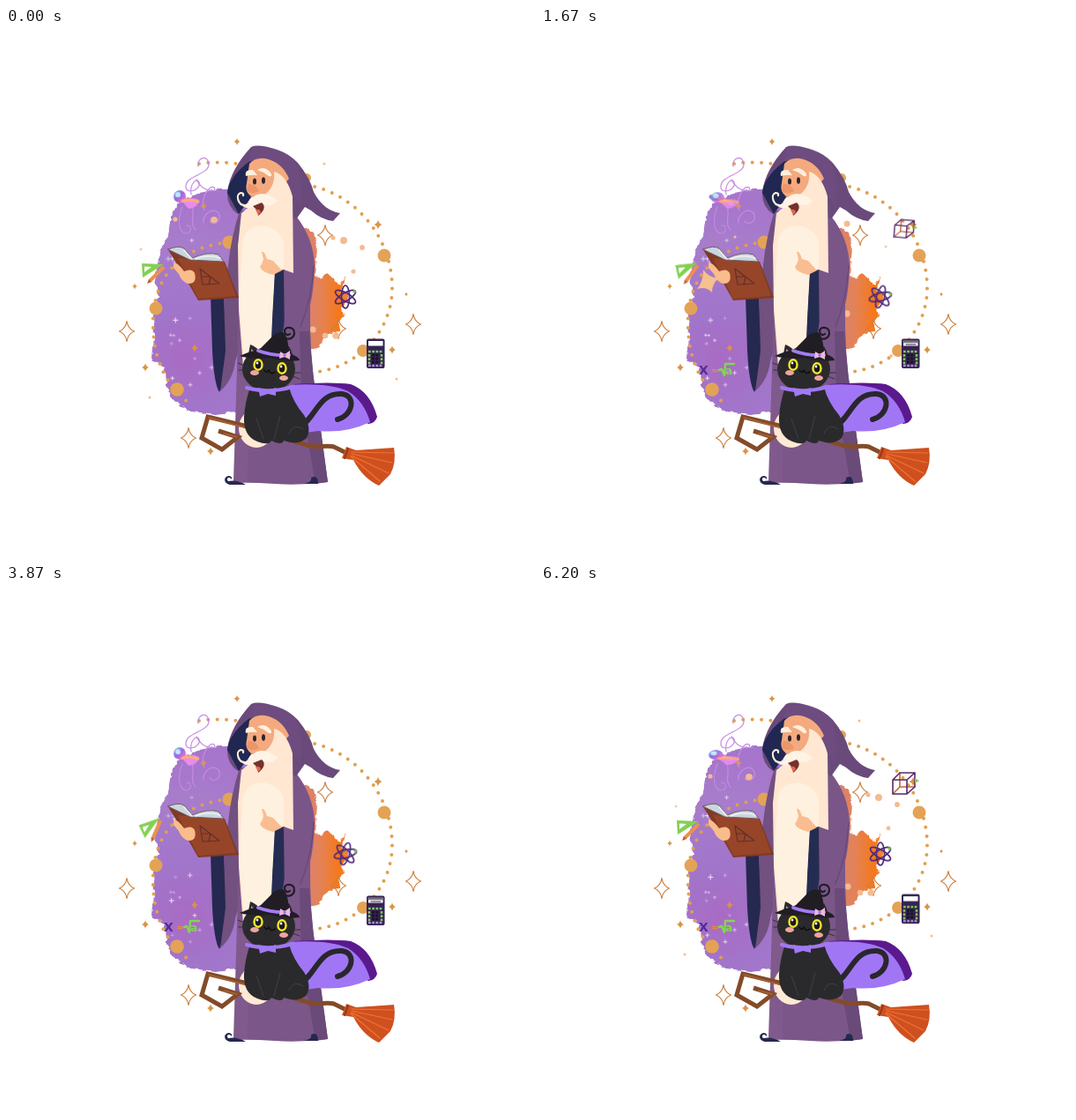
An HTML page that plays this animation: 600x600 px, repeating every 6230 ms.

```html
<!DOCTYPE html>
<html lang="en">
<head>
<meta charset="utf-8">
<title>Wizard and cat</title>
<style>
html, body { margin: 0; width: 100%; height: 100%; overflow: hidden; background: #fff; }
svg { display: block; width: 100%; height: 100%; }
.move, .dot, .twinkle { transform-box: fill-box; transform-origin: center; animation: 6230ms linear infinite; }

.pen { animation-name: pen; }
@keyframes pen {
  0%, 100% { transform: rotate(-20deg) scale(.8, .9); }
  12%, 20% { transform: none; }
  27% { transform: rotate(-12deg) scale(.85, 1); }
  36% { transform: rotate(-4deg); }
  43%, 50% { transform: rotate(-9deg) scale(1, .85); }
  62% { transform: rotate(-20deg) scale(.8, .9); }
  74%, 90% { transform: none; }
}
.glow { animation-name: glow; }
@keyframes glow {
  0%, 100% { opacity: 1; transform: none; }
  8%, 20% { opacity: 0; transform: scale(.4); }
  27% { opacity: .85; transform: translate(4px, 1px) scale(1.1, .9); }
  36% { opacity: .2; transform: scale(.6); }
  43% { opacity: .45; transform: translate(5px, 2px) scale(1, .4); }
  52% { opacity: .2; transform: scale(.6); }
  62% { opacity: 1; transform: none; }
  72%, 88% { opacity: 0; transform: scale(.4); }
  99.5% { opacity: .9; transform: translate(3px, 1px) scale(1.2, .8); }
}
.ruler { animation-name: ruler; }
@keyframes ruler {
  0%, 20%, 84%, 100% { transform: none; }
  27% { transform: rotate(-9deg); }
  43% { transform: rotate(-13deg); }
  62% { transform: rotate(-22deg); }
}
.cube { animation-name: cube; }
@keyframes cube {
  0%, 3% { opacity: 0; transform: scale(.2); }
  9%, 22% { opacity: 1; transform: none; }
  27% { transform: translateY(3px) rotate(5deg) scale(.86, .84); }
  33%, 53% { opacity: 1; transform: none; }
  57%, 65% { opacity: 0; transform: scale(.2); }
  71%, 100% { opacity: 1; transform: none; }
}
.atom { animation-name: atom; }
@keyframes atom {
  0%, 17%, 100% { transform: none; }
  27% { transform: rotate(16deg); }
  43% { transform: rotate(38deg); }
  62% { transform: rotate(16deg); }
  86% { transform: rotate(9deg); }
}
.calc { animation-name: calc; }
@keyframes calc {
  0%, 12%, 22%, 92% { transform: none; }
  17%, 100% { transform: translateY(-2px); }
}
.read { animation: read 6230ms step-end infinite; }
@keyframes read { 0% { opacity: 0; } 23% { opacity: 1; } 72% { opacity: 0; } }
.eq1, .eq2, .eq3 { animation: 6230ms step-end infinite; }
.eq1 { animation-name: eq1; }
.eq2 { animation-name: eq2; }
.eq3 { animation-name: eq3; }
@keyframes eq1 { 0%, 83% { opacity: 0; } 2.5%, 85.5% { opacity: 1; } }
@keyframes eq2 { 0%, 83% { opacity: 0; } 7%, 90.5% { opacity: 1; } }
@keyframes eq3 { 0%, 83% { opacity: 0; } 11%, 94.5% { opacity: 1; } }
.sparkA { animation-name: sparkA; }
.sparkB { animation-name: sparkB; }
@keyframes sparkA {
  0%, 10%, 23%, 100% { transform: scale(0); }
  17% { transform: scale(1); }
}
@keyframes sparkB {
  0%, 20%, 33%, 80%, 92%, 100% { transform: scale(0); }
  26.8% { transform: scale(1); }
  86% { transform: scale(.5); }
}
.dot { animation-name: pop; }
@keyframes pop {
  0%, 38%, 100% { transform: scale(0); }
  12%, 24% { transform: scale(1); }
}
.twinkle { animation-name: twinkle; animation-duration: 1557.5ms; }
@keyframes twinkle { 0%, 100% { opacity: 1; } 50% { opacity: .45; transform: scale(.7); } }
</style>
</head>
<body>
<svg viewBox="0 0 600 600" fill="none" stroke-linecap="round" stroke-linejoin="round">
<defs>
  <radialGradient id="violet" gradientUnits="userSpaceOnUse" cx="205" cy="375" r="190">
    <stop stop-color="#a96bc4"/><stop offset=".3" stop-color="#a175ca"/>
    <stop offset=".7" stop-color="#a77ccb"/><stop offset="1" stop-color="#a674cc"/>
  </radialGradient>
  <linearGradient id="ember" x1="0" x2="1">
    <stop stop-color="#d98173"/><stop offset=".4" stop-color="#e48254"/><stop offset=".75" stop-color="#f5781f"/>
  </linearGradient>
  <linearGradient id="rainbow" x1="0" x2="1" y2="1">
    <stop stop-color="#65c9ee"/><stop offset=".45" stop-color="#9c67e0"/><stop offset="1" stop-color="#ff79cf"/>
  </linearGradient>
  <filter id="rough" x="-10%" y="-10%" width="120%" height="120%">
    <feTurbulence type="fractalNoise" baseFrequency=".14" numOctaves="2" seed="4"/>
    <feDisplacementMap in="SourceGraphic" scale="6" xChannelSelector="R" yChannelSelector="G"/>
  </filter>
</defs>

<!-- watercolour backdrop -->
<g filter="url(#rough)">
  <path fill="url(#violet)" d="M275 183L240 183L214 188L195 199L187 214L184 234L174 255L169 285L173 305L167 327L168 349L166 376L181 386L182 407L192 425L210 435L238 438L275 433Z"/>
  <path fill="url(#ember)" d="M338 225L349 232L353 250L350 282L358 284L364 278L372 285L378 291L384 282L381 296L388 306L381 318L383 328L377 333L380 345L368 346L360 352L356 362L342 366Z"/>
</g>
<g id="crosses" stroke="#f5eaff" stroke-width="1"></g>

<!-- dotted orbits -->
<g stroke="#e1a04e" stroke-width="4" stroke-dasharray="0 10.4">
  <path d="M219 154Q252 149 290 160T350 180C402 193 438 242 438 295C438 345 397 388 344 391"/>
  <path d="M253 243C205 247 171 275 167 325C165 365 175 400 207 425"/>
</g>
<g id="balls" fill="#e3a357"></g>
<g id="gems" fill="#d89445"></g>
<g id="outlines" stroke="#cc8040" stroke-width="1.2"></g>
<g id="dots" fill="#f3bb91"></g>

<!-- curls -->
<g stroke="#c68be3" stroke-width="1.2">
  <path d="M218 157C216 147 229 143 230 154C231 166 205 167 204 179C203 190 222 184 219 175C216 169 208 177 210 189"/>
  <path d="M216 172C224 188 241 186 236 181C231 177 219 194 225 207"/>
  <path d="M200 203C194 217 196 232 204 233C211 233 211 223 205 224" stroke-dasharray="2 1.4"/>
  <path d="M210 198C216 211 207 222 215 229M224 221C222 209 239 202 242 212C244 221 234 224 231 219"/>
</g>

<path class="move sparkA" fill="#f3bd90" d="M203 393Q205 400 212 402Q205 404 203 411Q201 404 194 402Q201 400 203 393Z"/>
<path class="move sparkA" fill="#f0b48c" d="M347 200Q349 211 357 214Q349 216 347 226Q344 216 337 214Q345 211 347 200Z"/>
<path class="move sparkB" fill="#f6c08f" d="M184 274Q190 283 202 284Q194 289 194 300Q188 293 177 296Q184 288 184 274Z"/>

<!-- pencil and its glow -->
<g class="move pen">
  <path d="M197 191L214 200" stroke="#f39a78" stroke-width="6" stroke-linecap="butt"/>
  <path d="M197 190L214 199" stroke="#ffc59d" stroke-width="2"/>
  <path d="M192 189L198 192" stroke="#8e79a5" stroke-width="5"/>
  <path d="M213 203L216 197L220 203Z" fill="#f8c7a0"/>
</g>
<g class="move glow">
  <circle cx="197" cy="191" r="7" fill="url(#rainbow)"/>
  <circle cx="195" cy="189" r="3" fill="#bce8ff"/>
  <path d="M200 197Q210 190 219 195Q217 205 207 205Z" fill="#e98bf0"/>
  <path d="M200 196Q209 194 218 197" stroke="#ffac77" stroke-width="3"/>
</g>

<!-- triangle and pencil -->
<g class="move ruler">
  <path fill="#84d052" fill-rule="evenodd" d="M154 267L179 268L155 283ZM157 270.5V277L165 271Z"/>
  <path d="M163 287L179 271" stroke="#ec904e" stroke-width="4" stroke-linecap="butt"/>
  <path d="M160 290L162 285L165 288Z" fill="#b65b37"/>
</g>

<!-- equation -->
<g font-family="'DejaVu Sans', sans-serif" font-weight="700">
  <text class="eq1" x="179" y="393" font-size="14" fill="#542b98">X</text>
  <text class="eq2" x="193" y="392" font-size="10" fill="#ed8840">=</text>
  <g class="eq3">
    <path d="M202 388L205 387L208 394L209 381H219" stroke="#83d552" stroke-width="2.4"/>
    <text x="209" y="393" font-size="12" fill="#83d552">a</text>
  </g>
</g>

<!-- atom -->
<g class="move atom" stroke="#512a78" stroke-width="1.7">
  <ellipse cx="385" cy="305" rx="4.5" ry="13"/>
  <ellipse cx="385" cy="305" rx="4.5" ry="13" transform="rotate(60 385 305)"/>
  <ellipse cx="385" cy="305" rx="4.5" ry="13" transform="rotate(120 385 305)"/>
  <circle cx="385" cy="305" r="2.5" fill="#f18231" stroke="none"/>
  <circle cx="395" cy="299" r="1.8" fill="#79c957" stroke="none"/>
</g>

<!-- cube -->
<g class="move cube" stroke-width="1.6">
  <path stroke="#bd6742" d="M407 213V229H424M407 229L399 237"/>
  <path stroke="#582867" d="M399 221H415V237H399ZM407 213H424V229L415 237M407 213L399 221M424 213L415 221"/>
  <path d="M424 219L429 222L424 225Z" fill="#83cd62"/>
</g>

<!-- calculator -->
<g class="move calc">
  <rect x="409" y="352.5" width="20.5" height="33.5" rx="2" fill="#352154"/>
  <rect x="411" y="355" width="16.5" height="5.5" fill="#fff"/>
  <path class="read" d="M411 355H427.5V356.5H411ZM414 359H425" fill="#352154" stroke="#77727e" stroke-width="1.3"/>
  <g stroke-width="2.6" stroke-linecap="butt" stroke-dasharray="2.8 1.4">
    <path stroke="#80c55a" d="M411 367H427"/>
    <path stroke="#a98bd4" d="M411 383H427"/>
    <path stroke="#80c55a" d="M412 370V382M426 370V382"/>
    <path stroke="#18131f" d="M415 371H424M415 375H424M415 379H424"/>
  </g>
</g>

<!-- wizard -->
<path fill="#25284f" d="M232 304H247L250 356Q248 402 242 413Q236 404 234 366Z"/>
<path fill="#72507f" d="M265 207Q255 239 252 269L247 305L249 366L243 412Q258 398 260 378L275 330V207Z"/>
<path fill="#7b5688" d="M265 207L328 212Q349 238 350 270Q349 298 345 314Q344 367 352 421L365 515Q333 519 305 517T258 516L262 388L264 300Z"/>
<path fill="#6a4a79" d="M333 344H344Q347 390 353 425L365 515L351 517L335 424Z"/>
<path fill="#8b6596" d="M262 390L276 404L274 515H258Z" opacity=".3"/>
<path fill="#25294e" d="M257 518C248 519 245 510 252 508Q257 508 256 512C253 508 249 511 252 514Q262 512 272 518ZM338 517Q348 515 346 510Q354 506 354 517Z"/>

<path fill="#6a4a7b" d="M278 135Q286 131 307 138Q322 143 331 153Q345 170 349 186Q360 207 379 210L371 219Q357 217 346 207L339 203L329 217L280 190L263 211Q250 202 251 185Q255 160 278 135Z"/>
<path fill="#775289" d="M280 135Q311 133 326 149Q338 165 334 201L325 190Q312 155 275 151Z" opacity=".3"/>
<path fill="#202852" d="M275 152Q253 169 251 187L264 211L277 193L281 150Z"/>
<path fill="#f4aa7e" d="M276 154Q284 145 298 149Q314 154 321 171L306 186Q300 191 282 193Q270 188 273 176Z"/>
<path fill="#ffe7d2" d="M304 163Q318 166 325 191L326 278L305 275L301 335L300 408L284 415L269 385L264 320L263 247L267 210L292 190Q306 180 304 163Z"/>
<path fill="#fff1df" d="M269 239C277 216 309 222 315 242V272L305 279L300 376H270L264 310Z"/>
<ellipse cx="284" cy="454" rx="20" ry="22" fill="#ffe9d5"/>
<path fill="#eb9569" d="M275 177Q283 176 287 185Q278 190 273 184Z"/>
<path fill="#fff0dd" d="M272 168Q270 160 280 161L285 167Q279 166 272 168ZM285 161Q293 156 300 164Q303 169 298 168Q292 163 285 161Z"/>
<g fill="#30242a"><ellipse cx="282" cy="174" rx="2" ry="3.6"/><ellipse cx="292" cy="173" rx="2" ry="3.7"/></g>
<path fill="#fff3e6" d="M285 189Q295 185 308 196Q301 205 287 198Q278 208 268 202Q274 200 279 194Q281 190 285 189Z"/>
<path d="M272 201C263 202 260 189 266 187Q270 187 269 190" stroke="#fff0dc" stroke-width="2.2"/>
<path fill="#74322c" d="M280 202L290 198Q297 204 286 213Q286 207 280 202Z"/>
<path fill="#e5694c" d="M283 206Q288 205 289 209L286 212Z"/>
<path fill="#252c52" d="M305 276L316 274V332L312 358L300 382L302 330Z"/>
<path fill="#7a5588" d="M327 217Q350 240 349 273Q347 306 337 333L316 361L315 274L326 278Z"/>
<path d="M349 270Q347 307 334 339" stroke="#6a4878" stroke-width="1.3"/>
<path fill="#f9bd91" d="M290 254Q293 252 296 262L303 264L313 275L303 280Q290 277 288 271Q291 267 292 262Z"/>

<!-- book -->
<path fill="#803a25" d="M183 250L209 263L248 265L264 306L218 309L202 281Z"/>
<path fill="#974529" d="M195 261L247 265L261 304L218 307Z"/>
<path fill="#c9d6de" stroke="#755c62" stroke-width="1" d="M184 251Q196 246 202 250L211 261Q229 253 241 257L247 265L209 263Z"/>
<path d="M202 252L211 262M215 262Q229 256 243 261" stroke="#edf1f3" stroke-width="1.5"/>
<path d="M220 273L223 291L242 290ZM222 282H232L230 291" stroke="#632f2a" stroke-width="1.2"/>
<path fill="#f9bc8b" d="M190 266Q195 266 202 276Q211 272 214 278Q217 290 207 290Q199 288 196 279L190 272Z"/>

<!-- broom -->
<path d="M241 457L263 464L245 478L222 465L229 441L270 451L338 472C352 478 362 472 372 475L386 482" stroke="#844b29" stroke-width="5" stroke-linejoin="miter" stroke-linecap="butt"/>
<path d="M247 460L262 464M230 442L270 453" stroke="#a76337" stroke-width="1.3"/>
<path fill="#cf501f" d="M386 475L397 479L440 476Q443 493 436 506L423 519Q405 511 394 490L381 488Z"/>
<path d="M392 481L439 482M392 483L438 493M392 485L434 505M391 486L424 514" stroke="#f07334" stroke-width="1.2"/>
<path d="M388 477L384 488" stroke="#91371e" stroke-width="2"/>

<!-- cape and cat -->
<path fill="#5b198e" d="M326 404Q370 401 391 404Q413 412 421 441Q419 448 411 449Z"/>
<path fill="#a176f5" d="M321 405Q366 402 388 412Q406 423 413 447Q386 460 354 457L333 460Z"/>
<path d="M333 452C351 444 354 413 381 415C398 417 393 440 376 444" stroke="#29272d" stroke-width="6"/>
<g fill="#2a2a2c">
  <path d="M273 380L277 359Q285 362 291 370L307 370L321 361Q327 371 326 382Z"/>
  <ellipse cx="298" cy="387" rx="30" ry="25"/>
  <path d="M277 407Q298 400 321 408Q326 425 338 439Q347 454 341 465Q332 474 315 468Q313 474 301 468Q298 474 285 469Q269 463 270 441Q271 425 277 407Z"/>
</g>
<path d="M284 443L292 466M311 440L304 466M321 460Q326 447 337 455" stroke="#414044" stroke-width="1"/>
<path d="M278 364L278 373L286 370Z" fill="#a9969b"/>
<path fill="#201d24" d="M265 372Q278 366 287 365L300 352Q305 345 314 345Q320 349 321 369Q333 373 333 377Q317 379 298 374Q279 376 265 372Z"/>
<path d="M317 352C329 356 331 338 319 340C313 342 317 351 322 347" stroke="#201d24" stroke-width="2.2"/>
<path d="M286 366Q302 372 321 371" stroke="#a37bf2" stroke-width="4"/>
<path fill="#f1b6dc" d="M311 367L316 370L322 366L322 376L316 373L310 375Z"/>
<circle cx="316" cy="371" r="1.7" fill="#9272dc"/>
<g fill="#19191b" stroke="#f5e82c" stroke-width="2.4">
  <ellipse cx="286" cy="382" rx="4.5" ry="5.7"/><ellipse cx="313" cy="386" rx="4.5" ry="5.7"/>
</g>
<g fill="#fff"><circle cx="285" cy="380" r="1.4"/><circle cx="312" cy="384" r="1.4"/></g>
<g fill="#eda59e"><ellipse cx="282" cy="391" rx="5" ry="3"/><ellipse cx="315" cy="397" rx="5" ry="3"/></g>
<path d="M293 388Q296 393 298 388Q301 394 305 390" stroke="#09090a" stroke-width="1.3"/>
<path d="M263 380L273 384M264 388L273 388M325 391L334 391M325 395L333 398" stroke="#343136" stroke-width="1"/>
<path d="M273 408Q297 415 325 407" stroke="#a178f1" stroke-width="4"/>
<path fill="#a179f4" d="M286 408L296 411L306 408L306 417L297 415L288 418Z"/>
</svg>
<script>
const $ = id => document.getElementById(id);
const add = (id, tag, attrs) => {
  const el = document.createElementNS("http://www.w3.org/2000/svg", tag);
  for (const key in attrs) el.setAttribute(key, attrs[key]);
  $(id).append(el);
  return el;
};
const star = (x, y, w, h) => {
  const a = w * .27, b = h * .27;
  return `M${x} ${y - h}Q${x + a / 2} ${y - b} ${x + w} ${y}Q${x + a / 2} ${y + b} ${x} ${y + h}` +
    `Q${x - a / 2} ${y + b} ${x - w} ${y}Q${x - a / 2} ${y - b} ${x} ${y - h}Z`;
};
let seed = 17;
const rand = () => (seed = seed * 16807 % 2147483647) / 2147483647;

[[429, 258, 7.5], [253, 243, 7.5], [170, 318, 7.5], [194, 410, 7.8], [405, 366, 7], [341, 170, 5]]
  .forEach(([cx, cy, r]) => add("balls", "circle", {cx, cy, r}));
[[262, 129, 4], [422, 223, 5.5], [158, 385, 5], [438, 365, 5], [232, 480, 5], [146, 293, 3.5],
 [454, 302, 2.5], [214, 363, 5], [224, 202, 5]]
  .forEach(([x, y, h]) => add("gems", "path", {d: star(x, y, h * .8, h)}));
[[362, 235], [137, 344], [462, 336], [207, 465], [377, 341]]
  .forEach(([x, y]) => add("outlines", "path", {d: star(x, y, 8.5, 11.5)}));

for (let i = 0; i < 18; i++) {
  const x = 184 + rand() * 65, y = 215 + rand() * 198, r = 1.2 + rand() * 1.7;
  const el = add("crosses", "path", {d: `M${x - r} ${y}h${2 * r}M${x} ${y - r}v${2 * r}`, class: "twinkle"});
  el.style.animationDelay = -rand() * 1557 + "ms";
}

const pops = [[347, 222], [371, 238], [383, 241], [391, 248], [394, 276], [404, 249],
  [347, 324], [362, 349], [374, 349], [397, 372], [236, 218], [192, 217], [220, 237],
  [361, 154], [153, 251], [146, 301], [163, 419], [443, 398], [204, 277], [348, 342]];
pops.forEach(([cx, cy], i) => {
  const edge = cx < 165 || cx > 420 || cy < 160;
  const el = add("dots", "circle", {cx, cy, r: edge ? 1.5 : 2.5 + rand() * 1.5, class: "dot"});
  el.style.animationDelay = -(i % 3 ? 620 + rand() * 900 : 4700 + rand() * 1100) + "ms";
});
</script>
</body>
</html>
```
